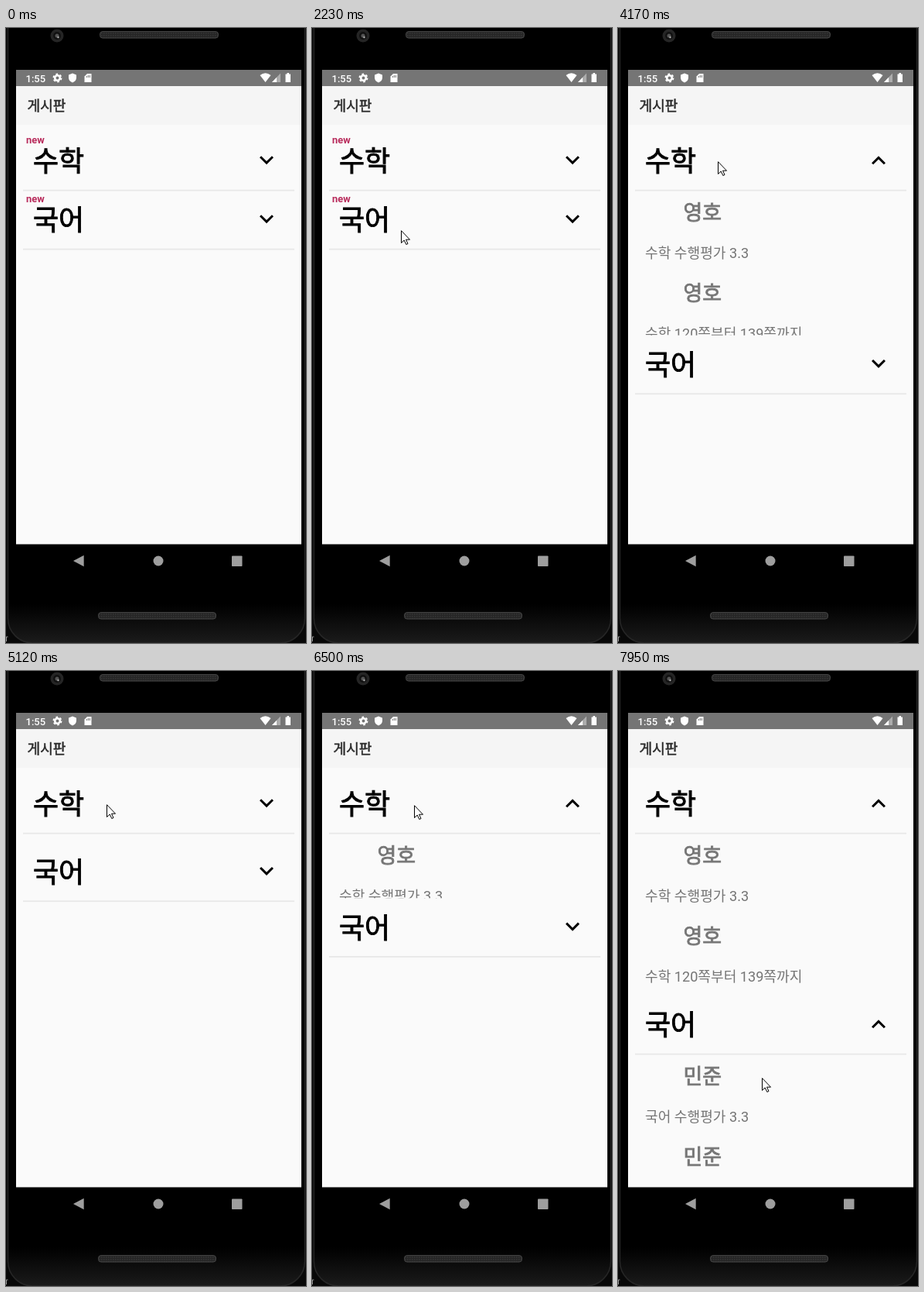
Animation, 388 px wide and 794 px high, one loop 8000 ms. Source, as an HTML page:

```html
<!DOCTYPE html>
<html lang="ko">
<head>
<meta charset="utf-8">
<title>게시판</title>
<style>
  html, body { margin: 0; width: 100%; height: 100%; overflow: hidden; background: #000; }
  svg { display: block; }
  #stage { width: 100vw; height: 100vh; }
  text { font-family: Roboto, "Noto Sans CJK KR", "Noto Sans CJK", sans-serif; }
  .bar { font-size: 18.1px; fill: #2b2b2b; stroke: #2b2b2b; stroke-width: .5; }
  .subject { font-size: 36px; fill: #000; stroke: #000; stroke-width: .9; }
  .new { font-size: 13px; font-weight: 700; fill: #b92d5d; }
  .author { font-size: 27px; fill: #757575; stroke: #757575; stroke-width: .8; }
  .post { font-size: 18.13px; fill: #757575; }
  .clock { font-size: 13px; font-weight: 500; fill: #fff; }
</style>
</head>
<body>
<svg id="stage" viewBox="0 0 388 794" preserveAspectRatio="none">
  <defs>
    <linearGradient id="foot" x2="0" y2="1"><stop offset=".94" stop-color="#000"/><stop offset="1" stop-color="#1b1b1b"/></linearGradient>
    <pattern id="mesh" width="3" height="3" patternUnits="userSpaceOnUse"><rect width="3" height="3" fill="#262626"/><rect width="1.5" height="1.5" fill="#363636"/></pattern>
  </defs>

  <!-- phone body -->
  <rect width="388" height="794" fill="#080808"/>
  <rect x="2.500" y="-40" width="384" height="834" rx="32" fill="url(#foot)" stroke="#262626" stroke-width="1.500"/>
  <path d="M.5 792V786H2.500" fill="none" stroke="#999"/>
  <circle cx="66" cy="10" r="8.500" fill="#252525"/>
  <circle cx="66" cy="10" r="5" fill="#111"/>
  <circle cx="66" cy="10" r="2.500" fill="#555"/>
  <circle cx="67.500" cy="12" r="1.200" fill="#aaa"/>
  <g fill="url(#mesh)" stroke="#444">
    <rect x="121.500" y="4.500" width="153" height="8.500" rx="3.500"/>
    <rect x="119.500" y="754.500" width="152" height="8.500" rx="3.500"/>
  </g>

  <!-- status and title bars -->
  <rect x="13" y="54" width="369" height="612.500" fill="#fafafa"/>
  <rect x="13" y="54" width="369" height="21" fill="#757575"/>
  <rect x="13" y="75" width="369" height="50" fill="#f5f5f5"/>
  <text class="clock" x="25.500" y="69.500">1:55</text>
  <g fill="#fff">
    <circle cx="66.500" cy="64.500" r="3.300" fill="none" stroke="#fff" stroke-width="2.600"/>
    <circle cx="66.500" cy="64.500" r="5.100" fill="none" stroke="#fff" stroke-width="1.800" stroke-dasharray="2.670 2.670"/>
    <path d="M86 58.500L91 60.500V64Q91 68.500 86 70.500Q81 68.500 81 64V60.500Z"/>
    <path d="M105 59H110.500V70H101.500V62.500Z"/>
    <path d="M104.300 62V64M106.300 61V64M108.300 61V64" stroke="#757575"/>
    <path d="M328.500 61Q335.500 55.500 342.500 61L335.500 70Z"/>
    <path d="M355 58.500V70H344Z" opacity=".4"/>
    <path d="M350 63.700V70H344Z"/>
    <path d="M361.500 59.500H363.500V58H366V59.500H368V70H361.500Z"/>
  </g>
  <text class="bar" x="27.500" y="106.500">게시판</text>

  <svg id="board" x="13" y="125" width="369" height="541.500" viewBox="13 125 369 541.500"></svg>

  <!-- navigation -->
  <g fill="#9e9e9e">
    <path d="M87 688L100.700 680.700V695.300Z"/>
    <circle cx="197" cy="688" r="6.500"/>
    <rect x="292" y="681.500" width="13.500" height="13.500" rx=".8"/>
  </g>

  <g id="pointer">
    <circle id="click" r="15" fill="#ff0" fill-opacity=".47"/>
    <path d="M.5 .7V16.500L4.200 13L6.800 18.500L9 17.500L6.500 12.200H11.500Z" fill="#fff" stroke="#000"/>
  </g>
</svg>

<script>
const LOOP = 8000;
const REFRESH = 77.5, ENTER = 200;            // screen refresh period, pointer arrival
const HOLD = 150, FOLD = 300;                 // press mark and folding durations
const LIST_TOP = 76, LIST_HEIGHT = 209, ROW = 104.6;

const $ = id => document.getElementById(id);
const show = (el, on) => el.setAttribute("visibility", on ? "visible" : "hidden");
const mix = (a, b, p) => a + (b - a) * p;
const smooth = p => (1 - Math.cos(Math.PI * Math.min(1, Math.max(0, p)))) / 2;

// Each tap: time pressed, time the list responds
const quickTaps = [5420, 5515, 5800, 5895].map(t => [t, t + 70]);
const subjects = [
  { name: "수학", author: "영호", top: 134,
    taps: [[3765, 3916], [4690, 4828], ...quickTaps, [6260, 6347]] },
  { name: "국어", author: "민준", top: 210,
    taps: [[2060, 2320], [3067, 3150], [7320, 7470]] }
];

// Pointer moves: start, end, destination
const entry = [263, 441];
const moves = [
  [ENTER, 355, 219, 167], [520, 740, 110, 198], [1000, 1360, 115, 225], [1480, 1830, 115, 261],
  [3185, 3685, 129, 172], [4300, 6200, 132, 173], [6660, 7270, 127, 454], [7850, 7940, 186, 525]
];

function pointerAt(t) {
  return moves.reduce(([x, y], [start, end, toX, toY]) => {
    const p = smooth((t - start) / (end - start));
    return [mix(x, toX, p), mix(y, toY, p)];
  }, entry);
}

// A tap reverses the list from wherever it is at that moment.
function foldAt(taps, t) {
  let from = 0, to = 0, since = 0;
  const at = time => mix(from, to, smooth((time - since) / FOLD));
  for (const [, response] of taps) {
    if (response > t) break;
    from = at(response);
    to = 1 - to;
    since = response;
  }
  return { open: to === 1, amount: at(t) };
}

const label = (cls, x, y, s) => `<text class="${cls}" x="${x}" y="${y}">${s}</text>`;

// Coordinates inside a section start at its header's top edge.
$("board").innerHTML = subjects.map((s, i) => `
  <g id="section${i}">
    <g id="new${i}">${label("new", 26, 14.7, "new")}</g>
    ${label("subject", 35, 51.3, s.name)}
    <path id="arrow${i}" d="M6.885 -5.555L0 1.315L-6.885 -5.555L-9 -3.440L0 5.560L9 -3.440Z"/>
    <rect x="22" y="74.700" width="351" height="1.800" fill="#e8e8e8"/>
    <svg id="list${i}" y="${LIST_TOP}" width="388" height="0">
      ${["수행평가 3.3", "120쪽부터 139쪽까지"].map((post, row) =>
        label("author", 84.5, 37.5 + row * ROW, s.author) +
        label("post", 35, 86.5 + row * ROW, `${s.name} ${post}`)).join("")}
    </svg>
  </g>`).join("");

function draw(now) {
  const t = ENTER + REFRESH * Math.floor((now - ENTER) / REFRESH);
  let shift = 0;
  subjects.forEach(({ top, taps }, i) => {
    const { open, amount } = foldAt(taps, t);
    const height = amount * LIST_HEIGHT;
    $("section" + i).setAttribute("transform", `translate(0 ${top + shift})`);
    $("arrow" + i).setAttribute("transform", `translate(337 36.8) scale(1 ${open ? -1 : 1})`);
    $("list" + i).setAttribute("height", height);
    show($("list" + i), height > 0);
    show($("new" + i), t < taps[0][1]);
    shift += height;
  });
  const [x, y] = pointerAt(t).map(Math.round);
  const pressed = subjects.some(s => s.taps.some(([press, response]) =>
    t >= press && t < Math.min(response, press + HOLD)));
  $("pointer").setAttribute("transform", `translate(${x} ${y})`);
  $("pointer").setAttribute("display", t < ENTER ? "none" : "inline");
  show($("click"), pressed);
}

const start = performance.now();
function tick() {
  draw((performance.now() - start) % LOOP);
  requestAnimationFrame(tick);
}
tick();
</script>
</body>
</html>
```
